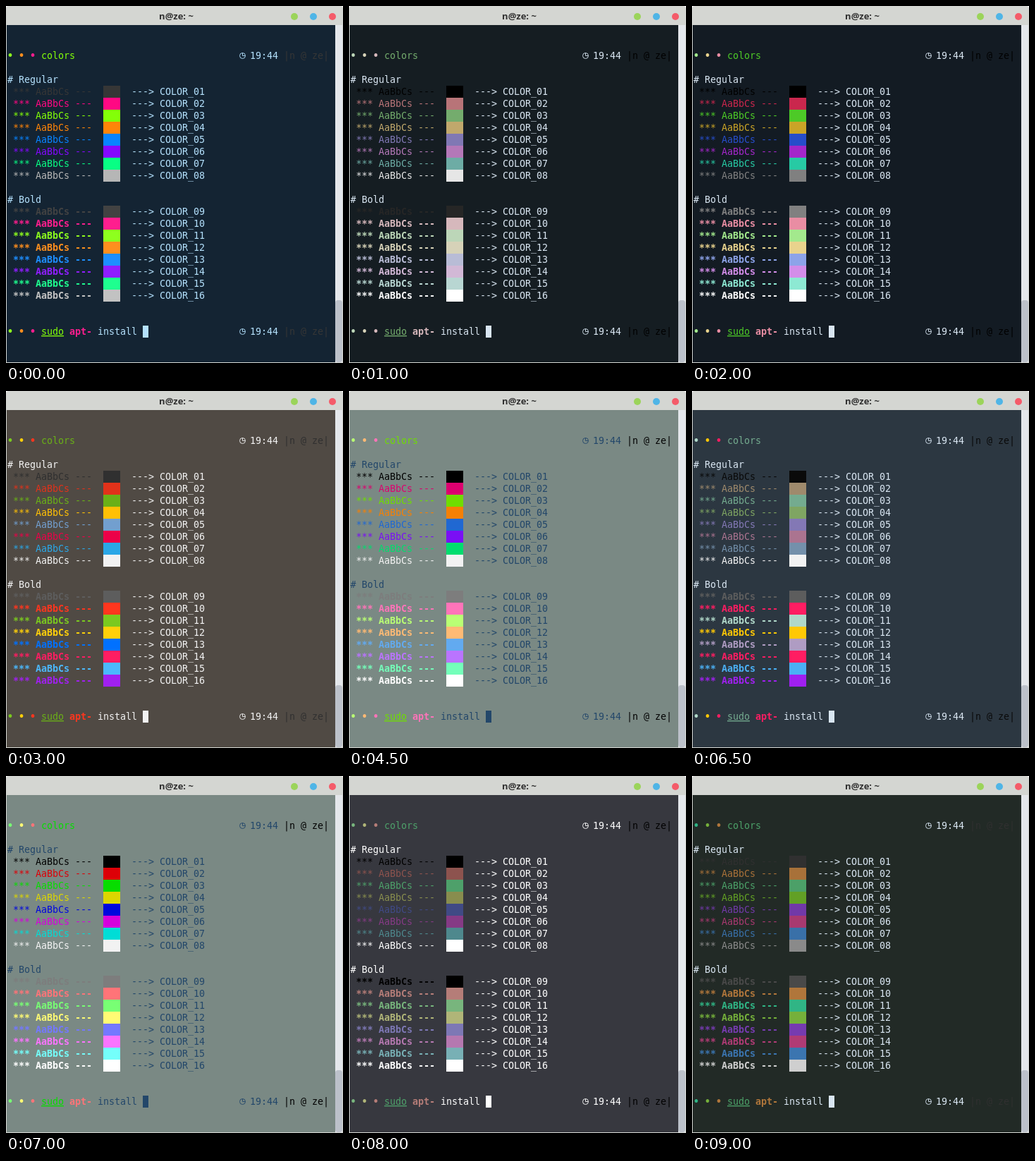
These frames come from a looping animation (478x506 px, 9500 ms). An HTML page:

```html
<!DOCTYPE html>
<html lang="en">
<head>
<meta charset="utf-8">
<title>Terminal colours</title>
<style>
html, body { margin: 0; width: 100%; height: 100%; overflow: hidden; background: #fff; }
svg { display: block; width: 478px; height: 506px; }
.cell { font: 13.333px "DejaVu Sans Mono", monospace; letter-spacing: -.027px; }
.bold { font-weight: bold; }
.line { text-decoration: underline; }
.title { font: bold 13px "Noto Sans", sans-serif; text-anchor: middle; fill: #303030; }
</style>
</head>
<body>
<svg id="stage" viewBox="0 0 478 506">
  <path d="M0 506V4Q0 0 4 0H474Q478 0 478 4V506Z" fill="#d4d6d2"/>
  <text class="title" x="241.5" y="19">n@ze: ~</text>
  <circle cx="409" cy="15" r="5" fill="#9bd45a"/>
  <circle cx="436" cy="15" r="5" fill="#4fb5e6"/>
  <circle cx="463" cy="15" r="5" fill="#f45b69"/>
  <rect x="1" y="27" width="466" height="478" fill="var(--bg)"/>
  <rect x="467" y="27" width="10" height="478" fill="#e4e7eb"/>
  <rect x="467" y="417" width="10" height="88" rx="4" fill="#bcc1ca"/>
</svg>
<script>
const STEP = 500;
const stage = document.getElementById('stage');

// Palettes. Wheel: bg fg red brightRed black white brightBlack brightWhite, then index:colour exceptions.
const flat = '303030 e1321a 6ab017 ffc005 729fcf ec0048 2aa7e7 f2f2f2 ' +
  '5d5d5d ff361e 7bc91f ffd00a 0071ff ff1d62 4bb8fd a020f0';
const solar = '073642 dc322f 859900 b58900 268bd2 ec0048 2aa198 94a3a5 ' +
  '586e75 cb4b16 859900 b58900 268bd2 d33682 2aa198 6c71c4';
const themes = [
  wheel('142433 b4e1fd ff0883 ff1e8e 363636 b6b6b6 424242 c2c2c2'),
  wheel('281d0f b4e1fd ff0883 ff1e8e 3f3f3f bebebe 474747 c4c4c4'),
  wheel('151d22 d9e6f2 ac6d74 d6b8bc 000000 e6e6e6 262626 ffffff 2:b87478 4:c0a86c 5:8078b4 6:b478b8'),
  wheel('0b3150 a9bed8 f557a0 f579b2 2c2423 918988 918988 f5eeec'),
  wheel('131b23 d9e6f2 ca274d e98da3 000000 808080 808080 ffffff'),
  list('131b23 f2f2f2 ' + flat + ' 5:004f9e'),
  list('504a44 f2f2f2 ' + flat),
  list('0e2343 f2f2f2 ' + flat),
  list('2e363a 94a3a5 ' + solar),
  wheel('7a8984 23476a dd006f ff74b9 000000 f2f2f2 7d7d7d ffffff 4:f58005 5:2068d2 6:7a0ff5 13:62aaf0'),
  wheel('ffffff 23476a b5407b cd73a0 000000 f8f8f8 737373 ffffff'),
  wheel('17222f d9e6f2 b87a7a dbbdbd 000000 d9d9d9 262626 ffffff'),
  wheel('7a8984 23476a dd6f00 ffb974 000000 f2f2f2 7d7d7d ffffff'),
  wheel('2c3741 d9e6f2 ab8f74 c3af9c 0a0a0a f2f2f2 5d5d5d a020f0 ' +
    '2:9f8a6c 4:7fa562 5:8378b5 10:ff1d62 11:b0d8c9 12:ffc805 14:ff1d62 15:4bb0f5'),
  wheel('7a8984 23476a dd0007 ff7478 000000 f2f2f2 7d7d7d ffffff'),
  wheel('332926 4882cd ab2463 f588b9 2c2423 918988 918988 f5eeec'),
  wheel('37383f ffffff 8d534e b57d78 000000 ffffff 000000 ffffff 3:4ea06a 5:404a85 6:853a85'),
  wheel('feffee 23476a c21b6f ee84b9 000000 808080 808080 e5e5e5'),
  wheel('222a26 d9e6f2 a87139 b0763b 303030 8a8a8a 494949 cfcfcf 3:4ca068 4:62a025 11:30b585')
];

function list(text) {
  const parts = text.split(' ');
  const [bg, fg, ...colors] = parts.filter(p => !p.includes(':'));
  for (const part of parts.filter(p => p.includes(':'))) {
    const [n, color] = part.split(':');
    colors[n - 1] = color;
  }
  return { bg, fg, colors };
}

// Green and blue rotate the channels of red; the other three are complements.
function hues(red) {
  const [r, g, b] = red.match(/../g).map(h => parseInt(h, 16));
  const sum = Math.max(r, g, b) + Math.min(r, g, b);
  const hex = c => c.map(v => v.toString(16).padStart(2, '0')).join('');
  const inverse = c => hex(c.map(v => sum - v));
  const green = [b, r, g], blue = [g, b, r];
  return [red, hex(green), inverse(blue), hex(blue), inverse(green), inverse([r, g, b])];
}

function wheel(text) {
  const [bg, fg, red, bright, black, white, black2, white2, ...rest] = text.split(' ');
  return list([bg, fg, black, ...hues(red), white, black2, ...hues(bright), white2, ...rest].join(' '));
}

function add(tag, attrs, text = '') {
  const el = document.createElementNS('http://www.w3.org/2000/svg', tag);
  for (const key in attrs) el.setAttribute(key, attrs[key]);
  el.textContent = text;
  return stage.appendChild(el);
}

const left = col => 2 + col * 8;
const top_ = row => 62 + row * 17;
const ink = color => `var(--${color})`;

function write(row, col, text, color = 'fg', style = '') {
  add('text', { x: left(col), y: top_(row) + 13, class: 'cell ' + style, fill: ink(color) }, text);
}

function block(row, col, cells, color) {
  add('rect', { x: left(col), y: top_(row), width: cells * 8, height: 17, fill: ink(color) });
}

function prompt(row) {
  ['c11', 'c12', 'c10'].forEach((color, i) => write(row, i * 2, '•', color, 'bold'));
  const y = top_(row) + 8.5;
  add('path', {
    d: `M331.5 ${y}a4 4 0 1 0 8 0a4 4 0 1 0 -8 0M335.5 ${y - 4}v4h4`,
    fill: 'none', stroke: ink('fg'), 'stroke-width': .9
  });
  write(row, 43, '19:44');
  write(row, 49, '|n @ ze|', 'c1');
}

function swatches(row, title, first, style) {
  write(row, 0, '# ' + title);
  for (let i = 0; i < 8; i++) {
    const n = first + i, color = 'c' + n, y = row + 1 + i;
    write(y, 1, '***', color, style);
    write(y, 5, 'AaBbCs', color, style);
    write(y, 12, '---', color, style);
    block(y, 17, 3, color);
    write(y, 22, '--->');
    write(y, 27, 'COLOR_' + String(n).padStart(2, '0'));
  }
}

prompt(0);
write(0, 6, 'colors', 'c3');
swatches(2, 'Regular', 1);
swatches(12, 'Bold', 9, 'bold');
prompt(23);
write(23, 6, 'sudo', 'c3', 'line');
write(23, 11, 'apt-', 'c10', 'bold');
write(23, 16, 'install');
block(23, 24, 1, 'fg');

let shown = -1;
function draw() {
  const index = Math.floor(performance.now() / STEP) % themes.length;
  if (index !== shown) {
    shown = index;
    const { bg, fg, colors } = themes[index];
    const set = (name, hex) => stage.style.setProperty('--' + name, '#' + hex);
    set('bg', bg);
    set('fg', fg);
    colors.forEach((hex, i) => set('c' + (i + 1), hex));
  }
  requestAnimationFrame(draw);
}
draw();
</script>
</body>
</html>
```
